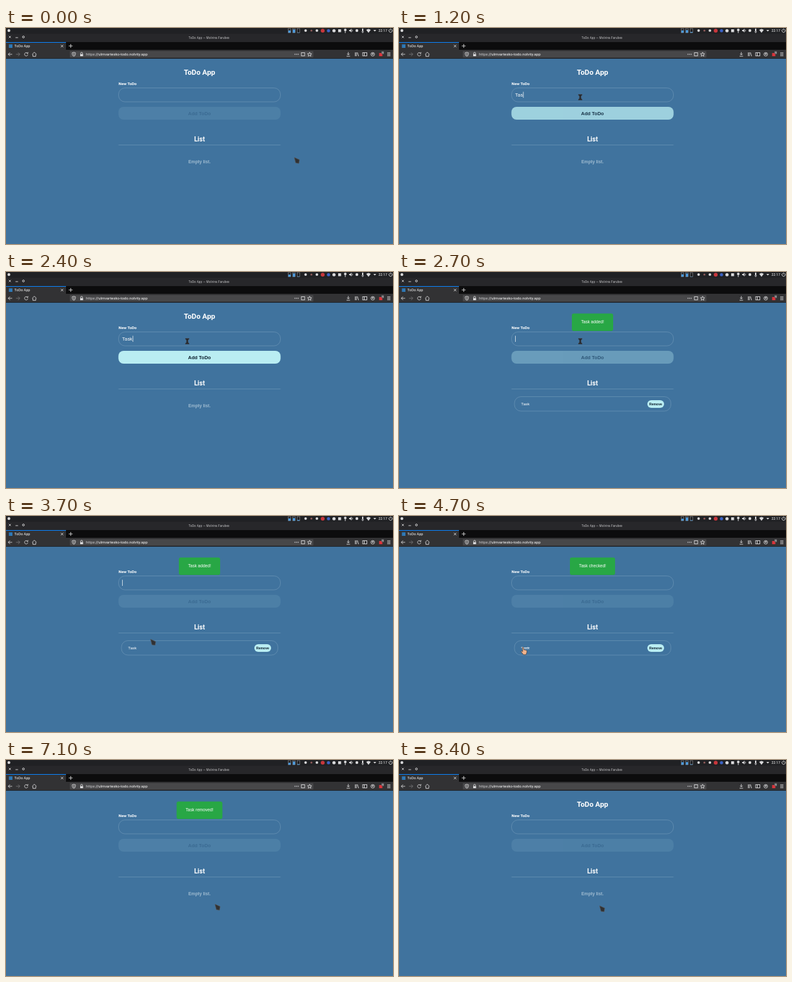
These frames come from a looping animation (600 by 337 pixels, 8700 ms). An HTML page:

```html
<!DOCTYPE html>
<html lang="en">
<head>
<meta charset="utf-8">
<title>ToDo App</title>
<style>
  html, body { margin: 0; width: 100%; height: 100%; overflow: hidden; background: #40739e; }
  svg { display: block; width: 100%; height: 100%; }
  text { font-family: Roboto, sans-serif; fill: #fff; white-space: pre; }
  .mid { text-anchor: middle; }
  .bold { font-weight: 700; }
  .arial { font-family: "Liberation Sans", Arial, sans-serif; }
  .line { fill: none; stroke: #d8d8da; stroke-width: .9; }
  .solid { fill: #d8d8da; }
  .rim { fill: none; stroke: #8fb0ca; stroke-opacity: .65; stroke-width: .6; }
</style>
</head>
<body>
<svg viewBox="0 0 600 337" preserveAspectRatio="none">
  <rect width="600" height="337" fill="#40739e"/>

  <!-- desktop bar and window title -->
  <rect width="600" height="22" fill="#27272a"/>
  <rect width="600" height="9" fill="#202124"/>
  <circle class="solid" cx="4.5" cy="4" r="2.2"/>
  <g id="meters"></g>
  <g class="solid">
    <circle cx="464.5" cy="4" r="2"/>
    <circle cx="473.5" cy="4" r="1.6" fill="#8d5a5a"/>
    <circle cx="482" cy="4" r="2"/>
    <circle cx="491" cy="4.3" r="3" fill="#c8373c"/>
    <circle cx="500" cy="4.3" r="2.5" fill="#3b62c4"/>
    <circle cx="508.5" cy="4.3" r="2.5"/>
    <rect x="515" y="2" width="4.5" height="4.5"/>
    <circle cx="526" cy="3" r="2"/>
    <path d="M525.5 4h1v4h-1zM532 3h1.5l2-2v6l-2-2H532z"/>
    <circle cx="544" cy="4" r="2.2"/>
    <path d="M552 1h2v4h-2zM551 5.5h4v.8h-1.5V8h-1V6.300h-1.500zM558.500 3q3.500-3 7 0l-3.500 4.500zM569.500 3h4.500l-2.200 2.500z"/>
  </g>
  <path class="line" d="M536.500 2.500q1.500 1.500 0 3M594.800 2a2.600 2.600 0 1 0 3 0M596.300.8v3"/>
  <text x="577.500" y="6.300" font-size="5.400">22:17</text>
  <path class="line" d="M4.500 12.500l3 3m0-3l-3 3M14.700 15h4"/>
  <circle class="line" cx="27" cy="14" r="1.500"/>
  <text class="mid" x="314.700" y="16.700" font-size="4.600" letter-spacing=".15" style="fill:#c6c6c8">ToDo App — Molvina Farubex</text>

  <!-- tabs -->
  <rect y="22" width="600" height="12.500" fill="#0c0c0d"/>
  <rect y="22" width="93" height="13" fill="#323234"/>
  <rect y="22" width="93" height="1" fill="#0a84ff"/>
  <rect x="4.500" y="25.500" width="5.500" height="5.500" fill="#2f78b5"/>
  <text x="13" y="30.400" font-size="5.600">ToDo App</text>
  <path class="line" d="M85 26.300l3.800 3.800m0-3.800l-3.800 3.800M97.300 28h6M100.300 25v6"/>

  <!-- toolbar -->
  <rect y="34" width="600" height="13.500" fill="#323234"/>
  <rect y="47" width="600" height=".7" fill="#141416"/>
  <rect x="99" y="36" width="377.500" height="10" rx="1" fill="#474749"/>
  <g class="line">
    <path d="M9.500 41h-6m2.700-2.700L3.500 41l2.700 2.700"/>
    <path stroke="#77777a" d="M15.500 41h6m-2.700-2.700l2.700 2.700-2.700 2.700"/>
    <path d="M33.300 39.300a2.600 2.600 0 1 0 .6 2.200M34 37.700v2h-2"/>
    <path d="M40.500 41l3.400-3.200 3.400 3.200M41.700 41v3.300h4.400V41"/>
    <path d="M102.700 38.700l2.500-.8 2.500.8v2q0 2.500-2.500 3.500-2.500-1-2.500-3.500zM105.200 39v3.800"/>
    <path d="M115.700 41v-1.500a1.500 1.500 0 0 1 3 0V41"/>
    <rect x="458" y="38.500" width="5" height="5"/>
    <path d="M470.700 37.800l.9 2.200 2.400.2-1.800 1.500.5 2.400-2-1.300-2 1.300.5-2.400-1.800-1.500 2.400-.2z"/>
    <path d="M530.700 37.500v4.500m-2-2l2 2 2-2M528 44h5.400M541.500 38v6M543.300 38v6M544.700 38l2 6"/>
    <rect x="553" y="38.500" width="6.500" height="5"/>
    <path d="M555.500 38.500v5"/>
    <circle cx="568.600" cy="41" r="2.800"/>
    <path d="M591 38.800h5M591 41h5M591 43.200h5"/>
  </g>
  <g class="solid">
    <rect x="115" y="40.800" width="4.500" height="3.200"/>
    <circle cx="448" cy="41" r=".8"/><circle cx="450.500" cy="41" r=".8"/><circle cx="453" cy="41" r=".8"/>
    <circle cx="568.600" cy="40.500" r="1.200"/>
  </g>
  <rect x="578.500" y="39" width="5" height="5" fill="#d8343b"/>
  <rect x="582" y="36.500" width="4" height="4" fill="#6d6d70"/>
  <text x="583" y="39.900" font-size="3.600">1</text>
  <text x="124" y="43" font-size="5.950"><tspan fill="#d0d0d2">https:</tspan><tspan>//ulmvartesko-todo.nolvity.app</tspan></text>

  <!-- page -->
  <text class="mid bold" x="300" y="73" font-size="11.250">ToDo App</text>
  <text class="bold" x="174.500" y="88.800" font-size="6.250">New ToDo</text>
  <rect class="rim" x="174.500" y="93.500" width="251" height="21.700" rx="10"/>
  <text id="entry" x="180" y="107.200" font-size="7.500"></text>
  <rect id="caret" x="180.100" y="99.500" width=".7" height="9.500" fill="#fff"/>
  <g id="add">
    <rect x="174.300" y="123" width="251.400" height="20" rx="8" fill="#b9edf2"/>
    <text class="mid bold arial" x="300" y="135.700" font-size="7.500" style="fill:#0b1e2c">Add ToDo</text>
  </g>
  <text class="mid bold" x="300" y="176.600" font-size="10">List</text>
  <path class="rim" d="M174.500 182.500h251"/>
  <text id="empty" class="mid bold arial" x="300" y="210.800" font-size="6.800" style="fill:#9ebbd0">Empty list.</text>
  <g id="item">
    <rect class="rim" x="179" y="194.500" width="242.500" height="22.500" rx="10"/>
    <text id="task" x="189.300" y="207.700" font-size="6.250">Task</text>
    <rect x="385" y="200" width="26" height="12" rx="6" fill="#b9edf2"/>
    <text class="mid bold arial" x="398" y="207.800" font-size="5.100" style="fill:#0b1e2c">Remove</text>
  </g>
  <g id="toast">
    <rect id="plate" y="64.800" height="27.200" rx="3" fill="#28a745"/>
    <text id="note" class="mid arial" x="300" y="79.500" font-size="6.600"></text>
  </g>

  <!-- mouse pointers, hot spot at 0,0 -->
  <g id="mouse">
    <path id="arrow" d="M0 0L8 3.600 7 9.200 2.200 8.600Z" fill="#303133" stroke="#55585b" stroke-width=".7" stroke-linejoin="round"/>
    <path id="beam" d="M-3-4.500H3v1.300L1.300-2v4L3 3.200v1.300H-3V3.200L-1.300 2v-4L-3-3.200Z" fill="#26282c" stroke="#4c5560" stroke-width=".4"/>
    <path id="hand" d="M-.8 0q.9-.9 1.700 0l.7 4 1.200-.3 1.300.4 1.200.3 1 1-.3 3.200-1.200 2.700H.8L-2.800 6.500q.5-1.400 1.800-.5l.8.500z" fill="#f2b48c" stroke="#463a38" stroke-width=".7" stroke-linejoin="round"/>
  </g>
</svg>
<script>
const LOOP = 8700, STEP = 100;
const FOCUS = 900, TYPE = 1000, SUBMIT = 2500, CHECK = 4500, REMOVE = 6600;
const $ = id => document.getElementById(id);
const show = (id, on) => $(id).setAttribute('display', on ? 'inline' : 'none');
const clamp = v => Math.max(0, Math.min(1, v));
const smooth = v => { v = clamp(v); return v * v * (3 - 2 * v); };

const toasts = [
  { at: SUBMIT, text: 'Task added!', width: 64 },
  { at: CHECK, text: 'Task checked!', width: 70 },
  { at: REMOVE, text: 'Task removed!', width: 71 }
];

// time, x, y
const path = [
  [0, 447, 202], [900, 281, 108], [2700, 281, 108], [3500, 230, 190],
  [4300, 192, 205], [5200, 192, 205], [5500, 215, 228], [5900, 320, 232],
  [6200, 380, 209], [6400, 394, 207], [6600, 394, 207], [6850, 360, 237],
  [7100, 324, 225], [7500, 300, 238], [7900, 285, 241], [8300, 281, 226],
  [8400, 311, 227.5], [LOOP, 311, 227.5]
];

function mouseAt(t) {
  const i = path.findIndex(p => p[0] > t);
  const [t0, x0, y0] = path[i - 1], [t1, x1, y1] = path[i];
  const k = smooth((t - t0) / (t1 - t0));
  return [x0 + (x1 - x0) * k, y0 + (y1 - y0) * k];
}

const inside = (x, y, l, t, r, b) => x >= l && x <= r && y >= t && y <= b;

function drawMouse(t, listed) {
  const [x, y] = mouseAt(t);
  const beam = inside(x, y, 174, 93, 426, 116);
  const hand = listed && (inside(x, y, 189, 200, 204, 211) || inside(x, y, 385, 200, 411, 212));
  $('mouse').setAttribute('transform', `translate(${x.toFixed(1)} ${y.toFixed(1)})`);
  show('beam', beam);
  show('hand', hand);
  show('arrow', !beam && !hand);
}

function drawToast(t) {
  const toast = toasts.find(n => t >= n.at && t < n.at + 1500);
  show('toast', toast);
  if (!toast) return;
  const age = t - toast.at;
  $('toast').setAttribute('opacity', Math.min(clamp((age + 100) / 200), clamp((1500 - age) / 200)));
  $('plate').setAttribute('x', 300 - toast.width / 2);
  $('plate').setAttribute('width', toast.width);
  $('note').textContent = toast.text;
}

function drawMeters(t) {
  $('meters').innerHTML = [437.5, 444.5, 451.5].map((x, i) => {
    const h = [3.5, 4.5, .8][i] + .5 * Math.sin(t / 400 + i * 2);
    return `<rect x="${x}" y="1" width="4" height="6.500" fill="none" stroke="#8a8c90" stroke-width=".6"/>
      <rect x="${x + .3}" y="${7.3 - h}" width="3.400" height="${h}" fill="#4a9be0"/>`;
  }).join('');
}

function drawForm(t) {
  const typed = t < SUBMIT ? Math.max(0, Math.floor((t - TYPE) / 100) + 1) : 0;
  const word = 'Task'.slice(0, typed);
  $('entry').textContent = word;

  const lastKey = t >= SUBMIT ? SUBMIT : t >= TYPE ? Math.min(t, TYPE + 300) : FOCUS;
  show('caret', t >= FOCUS && t < CHECK && (t - lastKey) % 1000 < 500);
  $('caret').setAttribute('x', 180.1 + [0, 4.2, 8.4, 12.4, 16.4][word.length]);

  const ready = smooth((t - TYPE) / 300) - smooth((t - SUBMIT) / 300);
  $('add').setAttribute('opacity', .1 + .9 * ready);
}

function draw(time) {
  const t = Math.floor(time % LOOP / STEP) * STEP;
  const listed = t >= SUBMIT && t < REMOVE;
  const done = t >= CHECK;
  drawMeters(t);
  drawForm(t);
  show('item', listed);
  show('empty', !listed);
  $('task').setAttribute('text-decoration', done ? 'line-through' : 'none');
  $('task').setAttribute('opacity', done ? .85 : 1);
  drawToast(t);
  drawMouse(t, listed);
}

const start = performance.now();
function tick() {
  draw(performance.now() - start);
  requestAnimationFrame(tick);
}
tick();
</script>
</body>
</html>
```
